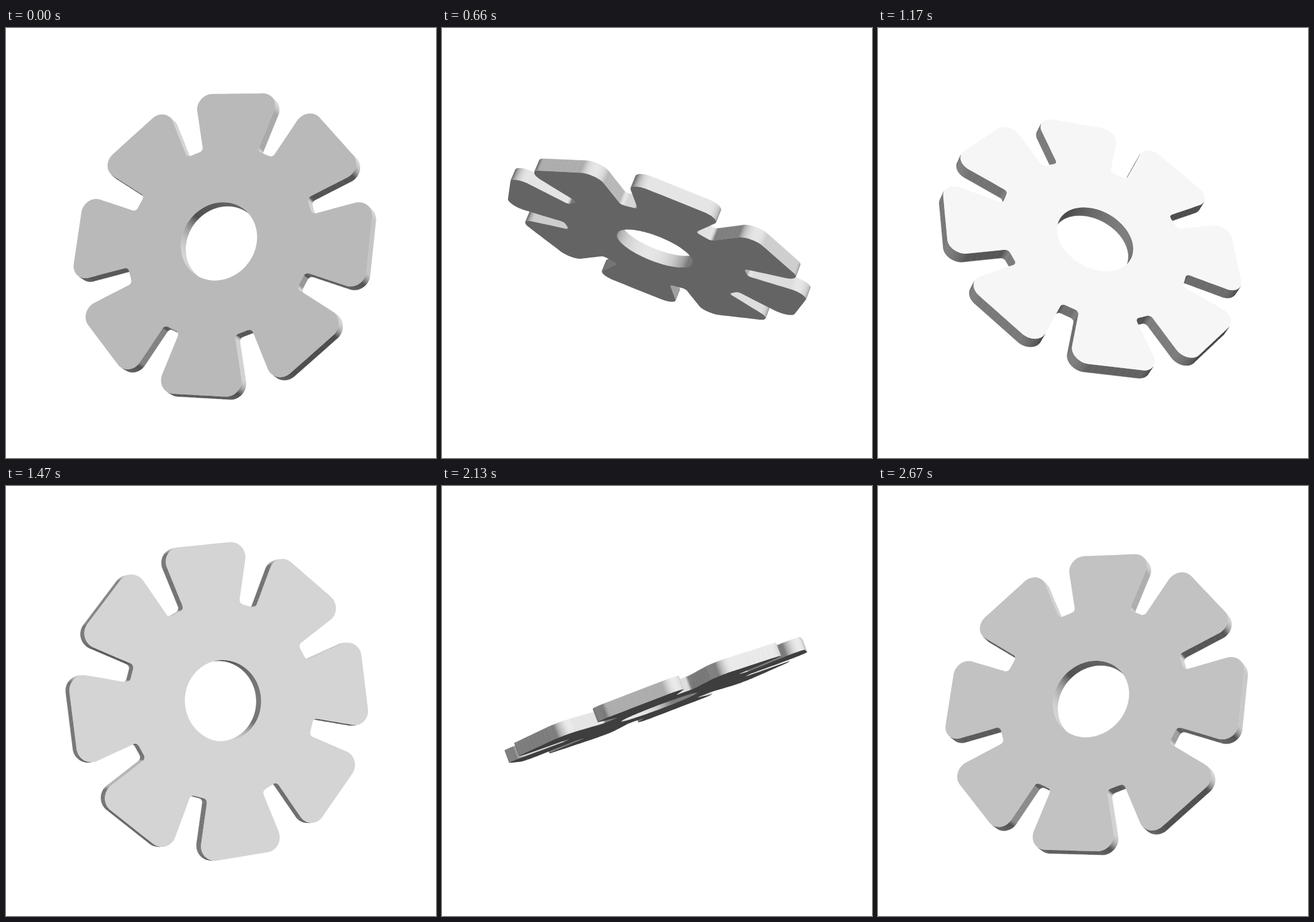
Animation, 684 px wide and 684 px high, one loop 2.7 s. Source, as an HTML page with a canvas:

```html
<!DOCTYPE html>
<html>
<head>
<meta charset="utf-8">
<style>
  html, body { margin: 0; width: 100%; height: 100%; overflow: hidden; background: #fff; }
  canvas { display: block; }
</style>
</head>
<body>
<canvas id="stage" width="684" height="684"></canvas>
<script>
const ctx = document.getElementById('stage').getContext('2d');
const RAD = Math.PI / 180, CENTER = 342, CAMERA = 2880, HALF = 10.4;
const TILT_SIN = Math.sin(20.6 * RAD), TILT_COS = Math.cos(20.6 * RAD);
const STEP_MS = 30, STEPS = 90, START = -17.35;

// Replace corner p (between a and b) by an arc of radius r.
function roundCorner(a, p, b, r) {
  const toward = q => {
    const d = Math.hypot(q[0] - p[0], q[1] - p[1]);
    return [(q[0] - p[0]) / d, (q[1] - p[1]) / d];
  };
  const d1 = toward(a), d2 = toward(b);
  const half = Math.acos(d1[0] * d2[0] + d1[1] * d2[1]) / 2;
  const reach = r / Math.sin(half) / (2 * Math.cos(half)), tangent = r / Math.tan(half);
  const cx = p[0] + (d1[0] + d2[0]) * reach, cy = p[1] + (d1[1] + d2[1]) * reach;
  const angle = d => Math.atan2(p[1] + d[1] * tangent - cy, p[0] + d[0] * tangent - cx);
  const from = angle(d1);
  let sweep = angle(d2) - from;
  sweep -= 2 * Math.PI * Math.round(sweep / (2 * Math.PI));
  const n = Math.ceil(r * Math.abs(sweep) / 2.5);
  return Array.from({ length: n + 1 }, (_, i) => {
    const t = from + sweep * i / n;
    return [cx + r * Math.cos(t), cy + r * Math.sin(t)];
  });
}

// Split long straight runs so that depth sorting works.
function subdivide(points) {
  return points.flatMap((p, i) => {
    const q = points[(i + 1) % points.length];
    const n = Math.ceil(Math.hypot(q[0] - p[0], q[1] - p[1]) / 12);
    return Array.from({ length: n }, (_, k) =>
      [p[0] + (q[0] - p[0]) * k / n, p[1] + (q[1] - p[1]) * k / n]);
  });
}

function gearOutline() {
  const tooth = [[151, -47, 7], [249, -75.2, 23.5], [249, 75.2, 23.5], [151, 47, 7]];
  const corners = [];
  for (let k = 0; k < 8; k++) {
    const c = Math.cos((45 * k - 7.5) * RAD), s = Math.sin((45 * k - 7.5) * RAD);
    for (const [x, y, r] of tooth) corners.push([x * c - y * s, x * s + y * c, r]);
  }
  const n = corners.length;
  return subdivide(corners.flatMap((p, i) =>
    roundCorner(corners[(i + n - 1) % n], p, corners[(i + 1) % n], p[2])));
}

const hole = Array.from({ length: 96 }, (_, i) => {
  const t = -2 * Math.PI * i / 96;
  return [64.6 * Math.cos(t), 64.6 * Math.sin(t)];
});
const loops = [gearOutline(), hole];

function shade([x, y, z]) {
  const key = Math.max(0, .6 * x + .75 * y + .28 * z);
  const fill = 60 + 53 * Math.sqrt(Math.max(0, z)) - 30 * x;
  const g = Math.round(Math.min(246, fill + 295 * key - 138 * key * key));
  return `rgb(${g},${g},${g})`;
}

function draw(phi) {
  const sin = Math.sin(phi), cos = Math.cos(phi);
  const rotate = (u, v, w) => {
    const depth = u * TILT_SIN + w * TILT_COS;
    return [u * TILT_COS - w * TILT_SIN, v * cos - depth * sin, v * sin + depth * cos];
  };
  const project = ([x, y, z]) => {
    const s = CAMERA / (CAMERA - z);
    return [CENTER + x * s, CENTER - y * s];
  };
  const faces = (n, p) => n[2] * CAMERA > n[0] * p[0] + n[1] * p[1] + n[2] * p[2];
  const trace = points => {
    points.forEach((p, i) => ctx[i ? 'lineTo' : 'moveTo'](...project(p)));
    ctx.closePath();
  };

  ctx.fillStyle = '#fff';
  ctx.fillRect(0, 0, 684, 684);

  const walls = [];
  for (const loop of loops) {
    loop.forEach((p, i) => {
      const q = loop[(i + 1) % loop.length];
      const dx = q[0] - p[0], dy = q[1] - p[1], d = Math.hypot(dx, dy);
      if (d < 1e-6) return;
      const normal = rotate(dy / d, -dx / d, 0);
      const middle = rotate((p[0] + q[0]) / 2, (p[1] + q[1]) / 2, 0);
      if (!faces(normal, middle)) return;
      const quad = [rotate(...p, HALF), rotate(...q, HALF), rotate(...q, -HALF), rotate(...p, -HALF)];
      walls.push({ quad, z: middle[2], color: shade(normal) });
    });
  }
  walls.sort((a, b) => a.z - b.z);
  ctx.lineWidth = .5;
  ctx.lineJoin = 'round';
  for (const { quad, color } of walls) {
    ctx.fillStyle = ctx.strokeStyle = color;
    ctx.beginPath();
    trace(quad);
    ctx.fill();
    ctx.stroke();
  }

  for (const side of [1, -1]) {
    const normal = rotate(0, 0, side);
    if (!faces(normal, rotate(0, 0, side * HALF))) continue;
    ctx.fillStyle = shade(normal);
    ctx.beginPath();
    for (const loop of loops) trace(loop.map(p => rotate(...p, side * HALF)));
    ctx.fill('evenodd');
  }
}

function frame() {
  const step = Math.floor(performance.now() / STEP_MS) % STEPS;
  draw((START + step * 360 / STEPS) * RAD);
  requestAnimationFrame(frame);
}
frame();
</script>
</body>
</html>
```
